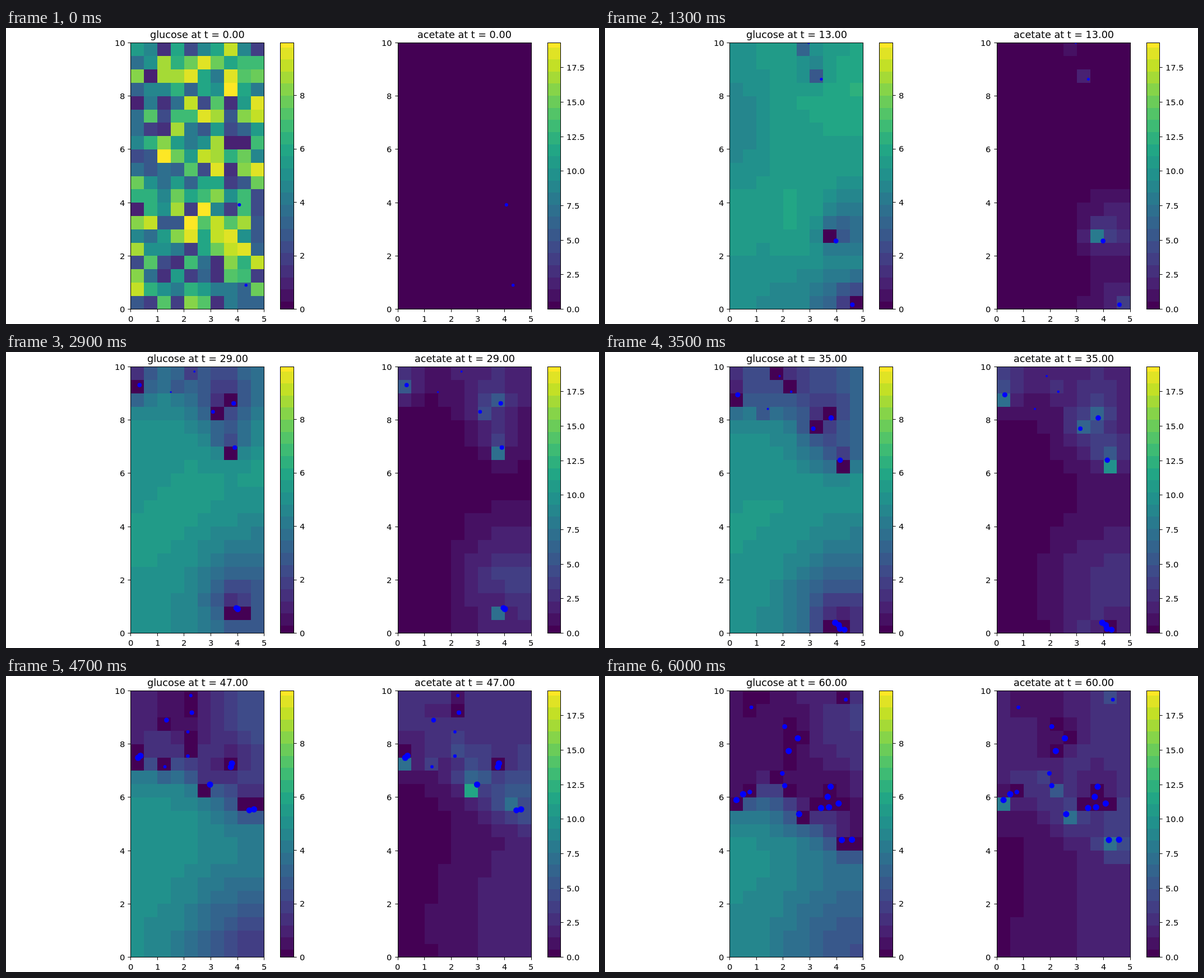
An HTML page with a canvas that plays this animation: 1058x529 px, repeating every 6100 ms.

```html
<!DOCTYPE html>
<html lang="en">
<head>
<meta charset="utf-8">
<title>Glucose and acetate</title>
<style>
  html, body { margin: 0; width: 100%; height: 100%; overflow: hidden; background: #fff; }
  canvas { display: block; }
</style>
</head>
<body>
<canvas id="stage" width="1058" height="529"></canvas>
<script>
const ctx = document.getElementById('stage').getContext('2d');
const COLS = 10, ROWS = 20, CELLS = COLS * ROWS;
const STEPS = 61, STEP_MS = 100, LEVELS = 22;
const TOP = 26.5, BOTTOM = 502.5, UNIT = 47.6;
const PT = 1058 / 720;
const MAX_GLUCOSE = 9.97, MAX_ACETATE = 19.3;
const VIRIDIS = ['440154', '482475', '414487', '355f8d', '2a788e', '21918c',
  '22a884', '44bf70', '7ad151', 'bddf26', 'fde725']
  .map(h => [0, 2, 4].map(i => parseInt(h.slice(i, i + 2), 16)));

const clamp = (v, a, b) => Math.min(b, Math.max(a, v));
const mix = (a, b, f) => a + (b - a) * f;
const snap = v => Math.floor(v) + 0.5;

function color(v) {
  const p = 10 * clamp(Math.floor(v * LEVELS + 0.35) / LEVELS, 0, 1);
  const i = Math.min(9, Math.floor(p));
  const c = VIRIDIS[i].map((a, k) => Math.round(mix(a, VIRIDIS[i + 1][k], p - i)));
  return `rgb(${c})`;
}

function random(seed) {
  return () => {
    seed = (Math.imul(seed, 1664525) + 1013904223) >>> 0;
    return seed / 4294967296;
  };
}

// Bacteria: a starting radius and a path of [time, x, y] points.
const bacteria = [];

function cell(r0, ...path) {
  const b = { r0, path, start: path[0][0], end: path[path.length - 1][0] };
  bacteria.push(b);
  return b;
}

function place({ path }, t) {
  let i = 0;
  while (i < path.length - 2 && t >= path[i + 1][0]) i++;
  const [t0, x0, y0] = path[i], [t1, x1, y1] = path[i + 1];
  const f = (t - t0) / (t1 - t0);
  return [mix(x0, x1, f), mix(y0, y1, f)];
}

// A daughter leaves its mother at time t and ends at x, y.
const bud = (mother, t, x, y) =>
  cell(4.5, [t, ...place(mother, t)], [mother.end, x, y]);

const low = cell(3, [0, 4.07, 3.92], [22, 3.92, 1.62], [36, 4.1, 0.2]);
bud(low, 25, 3.95, 0.3);
bud(low, 28, 4.15, 0.05);
bud(low, 29, 4.35, 0);
cell(2.7, [0, 4.32, 0.9], [16, 4.66, 0]);

const right = cell(1.8, [2, 3.2, 10], [22, 3.62, 7.52], [47, 4.62, 5.55], [60, 4.2, 4.4]);
bud(right, 41, 4.58, 4.41);
const middle = cell(2, [12, 2.95, 10.1], [35, 3.13, 7.68], [47, 2.97, 6.48], [60, 2.6, 5.37]);
bud(middle, 49, 3.42, 5.6);
const group = cell(2.6, [14, 4, 10], [35, 3.8, 8.08], [60, 3.78, 6.4]);
bud(group, 40, 3.67, 6.02);
bud(group, 49, 4.08, 5.77);
bud(group, 50, 3.72, 5.63);
const left = cell(3, [21, 0.37, 9.8], [35, 0.3, 8.95], [60, 0.25, 5.9]);
bud(left, 40, 0.5, 6.12);

cell(1.3, [21, 1.6, 9.9], [47, 1.28, 7.15], [60, 0.75, 6.2]);
cell(1.8, [28, 2.4, 9.95], [47, 2.14, 7.55], [60, 2.06, 6.44]);
cell(1.8, [32, 1.8, 9.95], [47, 2.14, 8.46], [60, 1.97, 6.9]);
cell(3.2, [37, 1.1, 10], [47, 1.34, 8.9], [60, 2.21, 7.74]);
cell(3.2, [39, 2.3, 10], [47, 2.29, 9.18], [60, 2.55, 8.22]);
cell(2.8, [45, 2.28, 10], [60, 2.06, 8.66]);
cell(2.7, [53, 0.76, 10], [60, 0.81, 9.38]);
cell(3.1, [57, 4.4, 9.95], [60, 4.35, 9.67]);

function alive(t) {
  return bacteria.filter(b => t >= b.start && t <= b.end).map(b => {
    const [x, y] = place(b, t);
    const r = Math.min(5.6, b.r0 * Math.exp(0.03 * (t - b.start)));
    const row = clamp(Math.floor((10 - y) * 2), 0, ROWS - 1);
    const col = clamp(Math.floor(x * 2), 0, COLS - 1);
    return { x, y, r, n: row * COLS + col };
  });
}

// Evenly spread values in shuffled order.
function startField() {
  const rnd = random(11);
  const field = Array.from({ length: CELLS }, (_, i) => mix(1, MAX_GLUCOSE, i / (CELLS - 1)));
  for (let i = CELLS - 1; i > 0; i--) {
    const j = Math.floor(rnd() * (i + 1));
    [field[i], field[j]] = [field[j], field[i]];
  }
  return field;
}

function diffuse(field, rate) {
  return field.map((v, n) => {
    const c = n % COLS;
    let flow = 0;
    if (c > 0) flow += field[n - 1] - v;
    if (c < COLS - 1) flow += field[n + 1] - v;
    if (n >= COLS) flow += field[n - COLS] - v;
    if (n < CELLS - COLS) flow += field[n + COLS] - v;
    return v + rate * flow;
  });
}

// Glucose is eaten and turned into acetate; starving cells eat acetate.
function feed({ r, n }, glucose, acetate) {
  const area = r * r;
  const eaten = Math.min(glucose[n], 0.3 * area);
  const hunger = Math.max(0, 0.06 * area - eaten);
  glucose[n] -= eaten;
  acetate[n] = Math.max(0, acetate[n] + 0.08 * area * eaten - 3 * hunger);
}

function simulate() {
  let glucose = startField(), acetate = Array(CELLS).fill(0);
  const history = [{ glucose, acetate, cells: alive(0) }];
  for (let t = 1; t < STEPS; t++) {
    const cells = alive(t);
    for (let i = 0; i < 2; i++) {
      glucose = diffuse(glucose, 0.1);
      acetate = diffuse(acetate, 0.1);
    }
    for (const c of cells) feed(c, glucose, acetate);
    history.push({ glucose, acetate, cells });
  }
  return history;
}

function line(x0, y0, x1, y1) {
  ctx.beginPath();
  ctx.moveTo(x0, y0);
  ctx.lineTo(x1, y1);
  ctx.stroke();
}

// Text sits on whole pixels; anchor is the share of its width left of x.
function label(text, x, y, anchor, size = 10) {
  ctx.font = `${size * PT}px "DejaVu Sans", sans-serif`;
  ctx.fillStyle = '#000';
  ctx.fillText(text, Math.round(x - anchor * ctx.measureText(text).width), Math.round(y));
}

function frameBox(x, w) {
  ctx.strokeRect(snap(x), TOP, snap(x + w) - snap(x), BOTTOM - TOP);
}

function plot(left, name, t, data, max, tickStep, digits, cells) {
  const w = 5 * UNIT, h = BOTTOM - TOP, size = UNIT / 2;
  const tick = 3.5 * PT, gap = 7 * PT;

  data.forEach((v, n) => {
    const c = n % COLS, r = Math.floor(n / COLS);
    const x = Math.round(left + c * size), y = Math.round(TOP + r * size);
    ctx.fillStyle = color(v / max);
    ctx.fillRect(x, y, Math.round(left + (c + 1) * size) - x,
      Math.round(TOP + (r + 1) * size) - y);
  });

  ctx.save();
  ctx.beginPath();
  ctx.rect(left, TOP, w, h);
  ctx.clip();
  ctx.fillStyle = '#00f';
  for (const b of cells) {
    ctx.beginPath();
    ctx.arc(left + b.x * UNIT, BOTTOM - b.y * UNIT, b.r, 0, Math.PI * 2);
    ctx.fill();
  }
  ctx.restore();

  ctx.strokeStyle = '#000';
  ctx.lineWidth = 1;
  frameBox(left, w);
  for (let i = 0; i <= 5; i++) {
    const x = left + i * UNIT, y = BOTTOM - i * 2 * UNIT;
    line(snap(x), BOTTOM, snap(x), BOTTOM + tick);
    label(i, x, 525, 0.5);
    line(snap(left) - tick, snap(y), snap(left), snap(y));
    label(i * 2, left - gap, y + 5.4, 1);
  }
  label(`${name} at t = ${t.toFixed(2)}`, left + w / 2, 18, 0.5, 12);

  const bar = left + 266.9, barW = UNIT / 2, edge = snap(bar + barW);
  for (let y = TOP; y < BOTTOM; y++) {
    ctx.fillStyle = color((BOTTOM - y - 0.5) / h);
    ctx.fillRect(snap(bar), Math.round(y), edge - snap(bar), 1);
  }
  frameBox(bar, barW);
  for (let v = 0; v < max; v += tickStep) {
    const y = BOTTOM - v / max * h;
    line(edge, snap(y), edge + tick, snap(y));
    label(v.toFixed(digits), edge + gap, y + 5.4, 0);
  }
}

const history = simulate();
let shown = -1;

function draw(now) {
  const t = Math.floor(now / STEP_MS) % STEPS;
  if (t !== shown) {
    shown = t;
    const { glucose, acetate, cells } = history[t];
    ctx.fillStyle = '#fff';
    ctx.fillRect(0, 0, 1058, 529);
    plot(222.6, 'glucose', t, glucose, MAX_GLUCOSE, 2, 0, cells);
    plot(699.1, 'acetate', t, acetate, MAX_ACETATE, 2.5, 1, cells);
  }
  requestAnimationFrame(draw);
}
requestAnimationFrame(draw);
</script>
</body>
</html>
```
